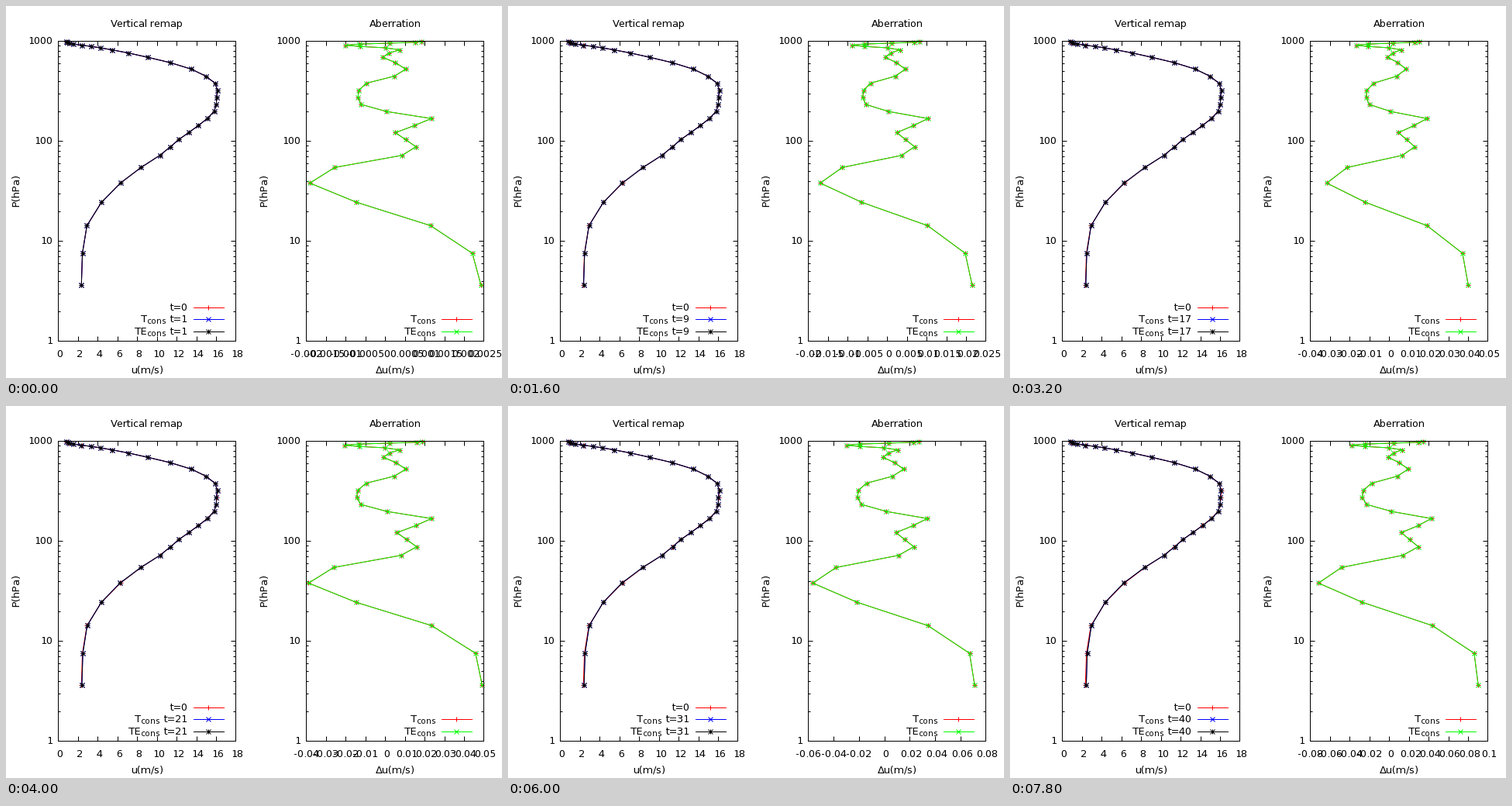
A matplotlib script for the animation above (8000 ms loop, 640 by 480 pixels).

```python
import math

import matplotlib.pyplot as plt
import numpy as np
from matplotlib.animation import FuncAnimation
from matplotlib.collections import LineCollection

W, H, DPI = 640, 480, 100
PX = 72 / DPI                      # one pixel in points
TOP, BOTTOM = 45, 432
LEFT, RIGHT = (67, 296), (387, 616)
KEY_Y = (389, 404, 420)
STEPS, LEVELS = 40, 30
RED, GREEN, BLUE, BLACK = "#ff0000", "#00ff00", "#0000ff", "#000000"


def level_heights():
    """Levels stacked up from the ground; the gaps widen with height."""
    gaps = np.interp(range(LEVELS - 1),
                     [0, 3, 6, 7, 17, 18, 22, 23, 28],
                     [41.2, 24.7, 11.1, 9.1, 9.1, 8.4, 2.6, 1.8, 0.9])
    return TOP + 0.4 + np.append(np.cumsum(gaps[::-1])[::-1], 0)


def jet_profile():
    """Smooth wind (m/s) through a knot on every second level."""
    knots = np.array([2.34, 2.9, 6.3, 10.3, 12.2, 14.2, 15.8, 16.05,
                      15.9, 13.5, 9.06, 5.45, 3.34, 1.57, 0.94, 0.78])
    slope = np.gradient(knots)
    mids = (knots[:-1] + knots[1:]) / 2 + (slope[:-1] - slope[1:]) / 8
    return np.column_stack((knots[:-1], mids)).ravel()


LEVEL_Y = level_heights()
WIND = jet_profile()
# drift per step at each level (1e-5 m/s), slowly smoothed by diffusion
DRIFT = np.array([243, 221, 115, -73, -191, -128, 43, 78, 52, 26,
                  74, 117, 3, -61, -69, -67, -48, 23, 52, 26,
                  -6, 10, 37, 1, -64, -100, -65, 12, 77, 92])
DIFFUSION = 0.065 * np.convolve(DRIFT, [1, -2, 1], "same")

plt.rcParams["font.family"] = "DejaVu Sans"
plt.rcParams["text.hinting_factor"] = 1
fig = plt.figure(figsize=(W / DPI, H / DPI), dpi=DPI, facecolor="white")
ax = fig.add_axes([0, 0, 1, 1])
# whole numbers fall just short of pixel centres, so lines snap onto them
ax.set_xlim(-0.49, W - 0.49)
ax.set_ylim(H - 0.49, -0.49)
ax.axis("off")


def text(x, y, s, ha="center", size=13, **kw):
    kw.setdefault("va", "baseline")
    return ax.text(x, y, s, ha=ha, fontsize=size * PX, color=BLACK, **kw)


def curve(x, y, color, shapes, z=2):
    """A line with each marker shape drawn on top of it."""
    style = dict(color=color, lw=PX, ms=6 * PX, mew=PX)
    parts = ax.plot(x, y, zorder=z, **style)
    for shape in shapes:
        parts += ax.plot(x, y, ls="none", marker=shape, zorder=z + 0.1,
                         **style)
    return parts


def segments(segs=()):
    return ax.add_collection(
        LineCollection(segs, colors=BLACK, linewidths=PX))


def to_x(v, span, lo, hi):
    return span[0] + (span[1] - span[0]) * (v - lo) / (hi - lo)


def x_ticks(xs):
    return [[(x, y), (x, y + d)] for x in xs
            for y, d in ((BOTTOM, -6), (TOP, 6))]


def tick_label(x, v):
    # non-negative numbers carry a leading blank
    return text(x + (2 if v >= 0 else 0), 453, f"{v:g}")


def key_label(right, row, name, tail=""):
    """Right-aligned label: name, subscript 'cons', optional tail."""
    base = KEY_Y[row] + 4
    parts = []
    if tail:
        parts.append(text(right, base, tail, "right"))
        right = parts[0].get_window_extent().x0 - 5
    parts.append(text(right, base + 1.5, "cons", "right", 10.4))
    right = parts[-1].get_window_extent().x0 - 0.7
    parts.append(text(right, base, name, "right"))
    return parts


def key_sample(x, row, color, shapes):
    y = KEY_Y[row]
    curve([x, x + 39], [y, y], color, "")
    for part in curve([x + 19], [y], color, shapes):
        part.set_zorder(3)


def panel(span, title, xlabel):
    x0, x1 = span
    mid = (x0 + x1) / 2
    curve([x0, x1, x1, x0, x0], [TOP, TOP, BOTTOM, BOTTOM, TOP], BLACK, "",
          z=5)
    segs = []
    for decade in range(4):
        base_y = BOTTOM - (BOTTOM - TOP) * decade / 3
        text(x0 - 7, base_y + 4, str(10 ** decade), "right")
        for m in range(1, 10 if decade < 3 else 1):
            y = base_y - (BOTTOM - TOP) * math.log10(m) / 3
            size = 6 if m == 1 else 3
            segs += [[(x0, y), (x0 + size, y)], [(x1, y), (x1 - size, y)]]
    segments(segs)
    text(mid, 27, title)
    text(mid, 473, xlabel)
    text(x0 - 54, 237.5, "P(hPa)", rotation=90, va="center")


def auto_range(lo, hi):
    """Round tick step and the limits counted in such steps."""
    power = 10.0 ** math.floor(math.log10(hi - lo))
    density = 20 / ((hi - lo) / power)
    unit = next(u for limit, u in ((10, 0.2), (4, 0.5), (0, 1))
                if density > limit)
    step = unit * power
    return math.floor(lo / step), math.ceil(hi / step), step


panel(LEFT, "Vertical remap", "u(m/s)")
panel(RIGHT, "Aberration", "Δu(m/s)")

wind_ticks = range(0, 19, 2)
segments(x_ticks([to_x(v, LEFT, 0, 18) for v in wind_ticks]))
for v in wind_ticks:
    tick_label(to_x(v, LEFT, 0, 18), v)

wind_x = to_x(WIND, LEFT, 0, 18)
curve(wind_x, LEVEL_Y, RED, "+")
wind_now = (curve(wind_x, LEVEL_Y, BLUE, "x", 2.3)
            + curve(wind_x, LEVEL_Y, BLACK, "+x", 2.6))
error_now = (curve(wind_x, LEVEL_Y, RED, "+")
             + curve(wind_x, LEVEL_Y, GREEN, "x", 2.3))

text(234, KEY_Y[0] + 4, "t=0", "right")
for row, (color, shapes) in enumerate(((RED, "+"), (BLUE, "x"),
                                       (BLACK, "+x"))):
    key_sample(242, row, color, shapes)
for row, name, color, shape in ((1, "T", RED, "+"), (2, "TE", GREEN, "x")):
    key_label(554.5, row, name)
    key_sample(562, row, color, shape)

error_ticks = segments()
labels = []


def draw(i):
    t = i + 1
    delta = (DRIFT + DIFFUSION * i / (STEPS - 1)) * t * 1e-5

    for artist in wind_now:
        artist.set_xdata(to_x(WIND + delta, LEFT, 0, 18))
    first, last, step = auto_range(delta.min(), delta.max())
    for artist in error_now:
        artist.set_xdata(to_x(delta, RIGHT, first * step, last * step))

    while labels:
        labels.pop().remove()
    counts = range(first, last + 1)
    xs = [to_x(k, RIGHT, first, last) for k in counts]
    error_ticks.set_segments(x_ticks(xs))
    labels.extend(tick_label(x, k * step) for x, k in zip(xs, counts))
    labels.extend(key_label(234, 1, "T", f"t={t}"))
    labels.extend(key_label(234, 2, "TE", f"t={t}"))
    return wind_now + error_now


anim = FuncAnimation(fig, draw, frames=STEPS, interval=200,
                     init_func=lambda: draw(0), repeat=True, repeat_delay=0,
                     blit=False)
plt.show()
```
